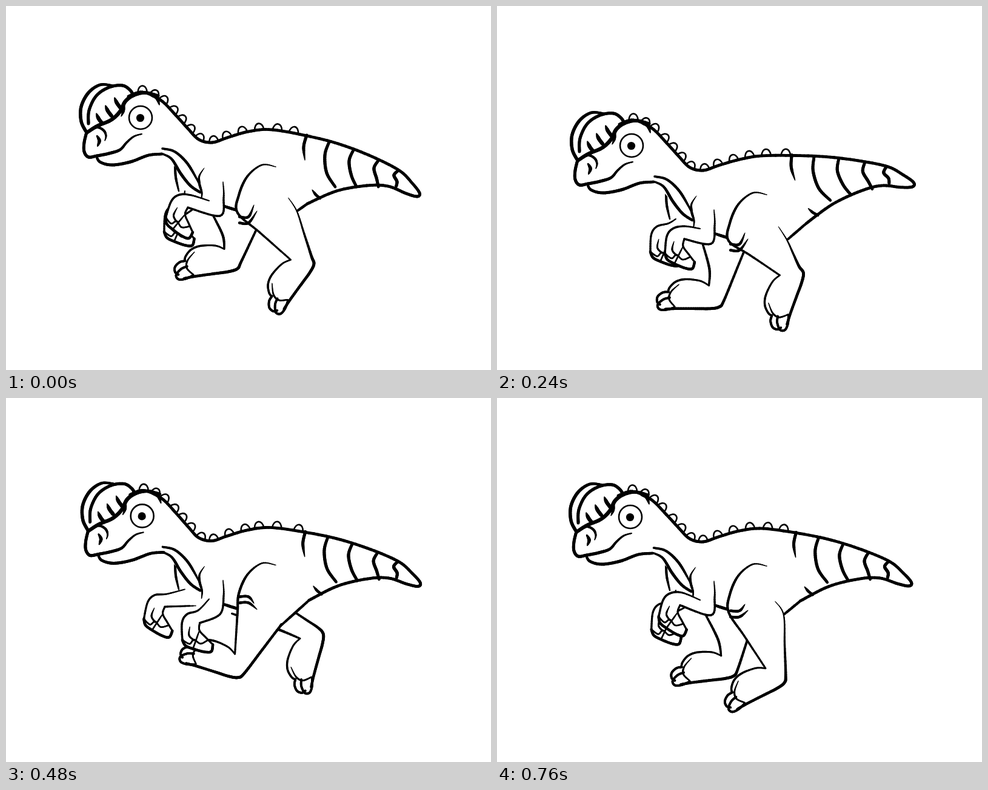
An HTML page with a canvas that plays this animation: 800x600 px, repeating every 0.8 s.

```html
<!DOCTYPE html>
<html lang="en">
<head>
<meta charset="utf-8">
<title>Running dinosaur</title>
<style>
  html, body { margin: 0; width: 100%; height: 100%; overflow: hidden; background: #fff; }
  canvas { display: block; width: 800px; height: 600px; }
</style>
</head>
<body>
<canvas id="stage" width="800" height="600"></canvas>
<script>
const ctx = document.getElementById('stage').getContext('2d');
const STEP = 40, COUNT = 20;
const nums = s => s.split(/[ ,]+/).map(Number);
const clamp = v => Math.max(0, Math.min(1, v));

// Key poses: head bob, then x, y and angle of each foot and hand.
const keys = [];
const pose = (at, bob, foot, farFoot, hand, farHand) =>
  keys.push({ at, bob, foot, farFoot, hand, farHand });
pose(0, [0, 0], [448, 506, -54], [282, 446, -8], [292, 318, 13], [280, 335, -3]);
pose(4, [2, 37.5], [509, 517, -85], [256, 465, 12], [292, 372, 2], [277, 375, -3]);
pose(6, [0, 46], [470, 534, -70], [266, 495, 0], [298, 372, 0], [272, 368, -3]);
pose(8, [-4, 25], [396, 519, -48], [311, 491, 0], [305, 362, -5], [268, 350, -4]);
pose(10, [0, -2], [313, 460, -7], [414, 492, -38], [305, 342, -7], [258, 322, 0]);
pose(14, [4, 30], [279, 423, 30], [546, 486, -100], [308, 380, -6], [250, 348, 11]);
pose(16, [0, 46], [297, 508, -1], [459, 522, -70], [300, 368, 0], [258, 370, 0]);
pose(19, [-2, 12], [384, 514, -27], [291, 469, -7], [293, 328, 9], [275, 345, -1]);

// Smooth cyclic interpolation between the key poses.
function poseAt(f) {
  const n = keys.length;
  const key = i => keys[(i + n) % n];
  const time = i => key(i).at + COUNT * Math.floor(i / n);
  let i = n - 1;
  while (keys[i].at > f) i--;
  const [t0, t1, t2, t3] = [-1, 0, 1, 2].map(d => time(i + d));
  const h = t2 - t1, t = (f - t1) / h, q = t * t, c = q * t;
  const out = {};
  for (const k of ['bob', 'foot', 'farFoot', 'hand', 'farHand']) {
    const [a, b, d, e] = [-1, 0, 1, 2].map(s => key(i + s)[k]);
    out[k] = b.map((v, j) => {
      const m1 = (d[j] - a[j]) / (t2 - t0) * h, m2 = (e[j] - v) / (t3 - t1) * h;
      return v * (2 * c - 3 * q + 1) + m1 * (c - 2 * q + t) + d[j] * (3 * q - 2 * c) + m2 * (c - q);
    });
  }
  return out;
}

// Catmull-Rom curve through flat x,y points.
function curve(p) {
  const n = p.length / 2, out = [];
  const at = (i, a) => p[2 * Math.max(0, Math.min(n - 1, i)) + a];
  for (let i = 0; i < n - 1; i++)
    for (let s = 0; s < 8; s++) {
      const t = s / 8;
      out.push([0, 1].map(a => {
        const [w, x, y, z] = [-1, 0, 1, 2].map(d => at(i + d, a));
        return x + t / 2 * (y - w + t * (2 * w - 5 * x + 4 * y - z + t * (3 * (x - y) + z - w)));
      }));
    }
  out.push([at(n - 1, 0), at(n - 1, 1)]);
  return out;
}

// Brush line; a and z are the relative widths at its ends.
function ink(p, w = 4, a = 1, z = 1) {
  const c = curve(p), n = c.length - 1;
  for (let i = 0; i < n; i++) {
    const t = (i + .5) / n;
    ctx.lineWidth = w * Math.min(1, a + (1 - a) * t / .4, z + (1 - z) * (1 - t) / .4);
    ctx.beginPath();
    ctx.moveTo(...c[i]);
    ctx.lineTo(...c[i + 1]);
    ctx.stroke();
  }
}

function mask(...lists) {
  ctx.fillStyle = '#fff';
  ctx.beginPath();
  for (const l of lists) for (const q of curve(l)) ctx.lineTo(...q);
  ctx.fill();
}

const shift = (p, x, y) => p.map((v, i) => v + (i % 2 ? y : x));
const between = (p, q, t) => p.map((v, i) => v + (q[i] - v) * t);
const flip = p => p.map((_, i) => p[p.length - 2 - i + 2 * (i % 2)]);

// Moves and turns a set of local curves.
function place(set, [x, y, deg], scale = 1) {
  const c = scale * Math.cos(deg * Math.PI / 180), s = scale * Math.sin(deg * Math.PI / 180);
  const turn = p => p.map((v, i) => i % 2 ? y + p[i - 1] * s + v * c : x + v * c - p[i + 1] * s);
  return Object.fromEntries(Object.entries(set).map(([k, p]) => [k, turn(nums(p))]));
}

// The body sinks by drop; the tail bends more towards its tip.
function bend(p, drop) {
  const b = drop / 46;
  return p.map((v, i) => {
    const x = i % 2 ? p[i - 1] : v, y = i % 2 ? v : p[i + 1];
    const d = Math.max(0, x - 420);
    if (i % 2) return y + drop - b * d * (.15 + .00035 * d);
    return d ? x + b * (.15 + .0007 * d) * (y - 262 - .17 * (x - 500)) * clamp(d / 60) : x;
  });
}

const FOOT = {
  top: '88,-36 73,-44 48,-47 31,-43 20,-33 17,-25',
  claw: '18,-25 8,-24 -1,-17 -2,-8 3,-3',
  claw2: '20,-15 9,-12 -1,-3 2,5 14,6 28,2',
  toe: '36,-38 22,-25 19,-12 29,1',
  sole: '12,5 32,4 65,4 90,4 106,1 114,-10'
};
const HAND = {
  back: '11,-9 -8,-5 -18,8 -21,36',
  palm: '11,12 9,24 18,37 28,50',
  claws: '-21,36 -17,46 -5,53 12,60 24,61 28,50',
  nails: '-21,36 -10,44 -2,38 8,46 20,42',
  finger: '-6,16 -9,30 -2,39',
  finger2: '9,24 3,36 -5,52'
};
const BACK = nums('202,149 225,142 255,155 280,180 300,202 318,220 340,225 365,217 400,207 440,204 ' +
  '510,217 560,231 610,251 650,272 670,292 682,308 678,314 660,309 630,297 595,296 545,305 497,326');
const BELLY = nums('385,335 358,329 320,307 285,272 256,244 215,240');
const THIGH = nums('445,265 422,262 398,281 384,312 382,341');

const line = (p, ...w) => [nums(p), ...w];
const CHEST = [
  line('258,235 278,240 298,258 314,284 322,302', 4.4, .8, .3),
  line('256,243 273,252 288,276 304,296 320,307', 4.8, .6, .9),
  line('327,267 319,280 319,293 323,308 322,320', 4, .2, .3),
  line('357,329 369,333 382,337', 4.8, .8)
];
const HEAD = [
  line('132,207 124,190 124,166 136,143 155,130 175,131', 5.4, 1, .7),
  line('136,194 137,172 149,148 170,134 192,131 205,139 210,148', 5),
  line('133,209 150,198 173,188 188,174 197,157 211,147 230,143 251,148', 6.2, .9, .8),
  line('241,147 249,152 253,163', 5.4, 1, .2),
  line('194,163 194,172 190,182', 4.4, 1, .2),
  line('133,208 129,225 129,240 136,249 150,247 170,243 188,237 199,225 211,215 224,211', 5, 1, .4),
  line('137,207 150,200 161,205 165,214 163,222', 4, 1, .3),
  line('150,214 154,222 151,231', 5.4, .4, .3),
  line('149,247 155,257 175,262 205,257 235,246 258,244', 5, .8, .9)
];

function drawLeg(f, front, rear, a, z) {
  const shin = [...front, ...f.top.slice(0, 2)], calf = [...f.sole, ...rear];
  mask(shin, f.top, f.claw, f.claw2.slice(4, 8), calf);
  ink(shin, 4.2, a, .7);
  ink(f.top, 3.4, .7);
  ink(f.claw, 3.8);
  ink(f.claw2, 3.8);
  ink(f.toe, 3, .4, .8);
  ink(calf, 4.8, .9, z);
}

function farLeg(at, hy) {
  const f = place(FOOT, at, .95);
  const ankle = f.top.slice(0, 2), heel = f.sole.slice(-2);
  const groin = [338 + .25 * (ankle[0] - 346), 345 + hy];
  const hip = [425 + .4 * (heel[0] - 390), 345 + .7 * hy];
  const knee = shift(between(groin, ankle, .6), 5, 0);
  drawLeg(f, [...groin, ...knee], [...between(heel, hip, .5), ...hip], .8, .7);
}

// The rump follows the heel of the near leg.
function rumpAt(heel, hy) {
  const x = 450 + .25 * (heel[0] - 385);
  return [x, 818 - x + hy];
}

function nearLeg(f, rump, hy) {
  const ankle = f.top.slice(0, 2), heel = f.sole.slice(-2);
  const thigh = shift(THIGH, 0, hy);
  const knee = between(thigh.slice(-2), ankle, .42);
  const tuck = clamp((362 - rump[1] + hy) / 12);
  const rear = [...between(heel, rump, .5), ...rump, ...shift(rump, -14 * tuck, -22 * tuck)];
  drawLeg(f, [...thigh, ...knee], rear, .3, .2 + .6 * (1 - tuck));
  const y = 315 + .33 * (ankle[0] - 371) + hy;
  for (const d of [0, 10])
    ink([385, y + d, 400, y + d, 409 + d / 2, 328 + hy + d], 4.4, 1, .2);
}

// Forearm from its top and lower ends to the hand.
function drawArm(at, top, lower, w) {
  const h = place(HAND, at);
  const back = [...top, ...h.back], under = [...lower, ...h.palm.slice(0, 2)];
  mask(back, h.claws, flip(h.palm), flip(under));
  ink(back, w, .6);
  ink(under, w, .4);
  ink(h.palm, 3);
  ink(h.claws, 4.4);
  ink(h.nails, 2.6);
  ink(h.finger, 3, .3);
  ink(h.finger2, 2.6, .5);
}

// Bumps along the back, spaced a little wider towards the tail.
function drawBumps(back) {
  const c = curve(back);
  let run = 0, n = 0;
  ctx.lineWidth = 2.6;
  for (let i = 1; n < 13; i++) {
    const dx = c[i][0] - c[i - 1][0], dy = c[i][1] - c[i - 1][1];
    run += Math.hypot(dx, dy);
    if (run < 22 + 18.1 * n + .46 * n * n) continue;
    n++;
    ctx.beginPath();
    ctx.ellipse(...c[i], 7.5, 10.5, Math.atan2(dy, dx), 0, 7);
    ctx.stroke();
  }
}

function drawTail(hy) {
  for (const x of [533, 573, 614, 647]) {
    const d = x - 533, top = 224 + .3 * d + .001 * d * d;
    const low = x + 10 - .12 * d;
    ink(bend([x, top, x - 7, .7 * top + 89, x - 4 + d / 60, .3 * top + 208, low, 298], hy), 5.2, .9, .9);
  }
  ink(bend([496, 213, 491, 232, 493, 254], hy), 5, 1, .2);
  ink(bend([505, 303, 511, 311, 518, 317], hy), 4.4, .2);
}

function drawHead(hx, hy) {
  for (const [p, ...w] of HEAD) ink(shift(p, hx, hy), ...w);
  for (let i = 0; i < 3; i++) {
    const x = 149 + 15 * i + hx, y = 177 - 13 * i + hy;
    ink([x, y, x + 4, y + 9, x + 10, y + 17], 6, .15, 1);
  }
  ctx.lineWidth = 2.6;
  ctx.beginPath();
  ctx.arc(222 + hx, 184 + hy, 19, 0, 7);
  ctx.stroke();
  ctx.fillStyle = '#000';
  ctx.beginPath();
  ctx.arc(221.5 + hx, 184.5 + hy, 6.6, 0, 7);
  ctx.fill();
}

function draw(f) {
  const p = poseAt(f), [hx, hy] = p.bob;
  const foot = place(FOOT, p.foot, .95);
  const rump = rumpAt(foot.sole.slice(-2), hy);
  const back = bend(BACK, hy).map((v, i) => i % 2 ? v : v + hx * clamp(1 - i / 10));
  const haunch = [...back.slice(-2), ...rump];

  ctx.fillStyle = '#fff';
  ctx.fillRect(0, 0, 800, 600);

  farLeg(p.farFoot, hy);
  drawArm(p.farHand, [295, 305 + hy], [313, 332 + hy], 3.2);
  ink(shift([279, 262, 280, 282, 285, 305], 0, hy), 4, 1, .6);

  drawBumps(back);
  mask(back, haunch, shift(BELLY, 0, hy));
  ink(back, 4.8);
  ink(haunch, 4.4, .9, .8);
  drawTail(hy);
  for (const [s, ...w] of CHEST) ink(shift(s, hy / 23, hy), ...w);

  nearLeg(foot, rump, hy);
  drawArm(p.hand, [335, 321 + hy], [358, 290 + hy, 359, 316 + hy, 353, 346 + hy], 3.4);
  drawHead(hx, hy);
}

ctx.lineCap = ctx.lineJoin = 'round';
let shown = -1;
function tick() {
  const f = Math.floor(performance.now() / STEP) % COUNT;
  if (f !== shown) draw(shown = f);
  requestAnimationFrame(tick);
}
tick();
</script>
</body>
</html>
```
